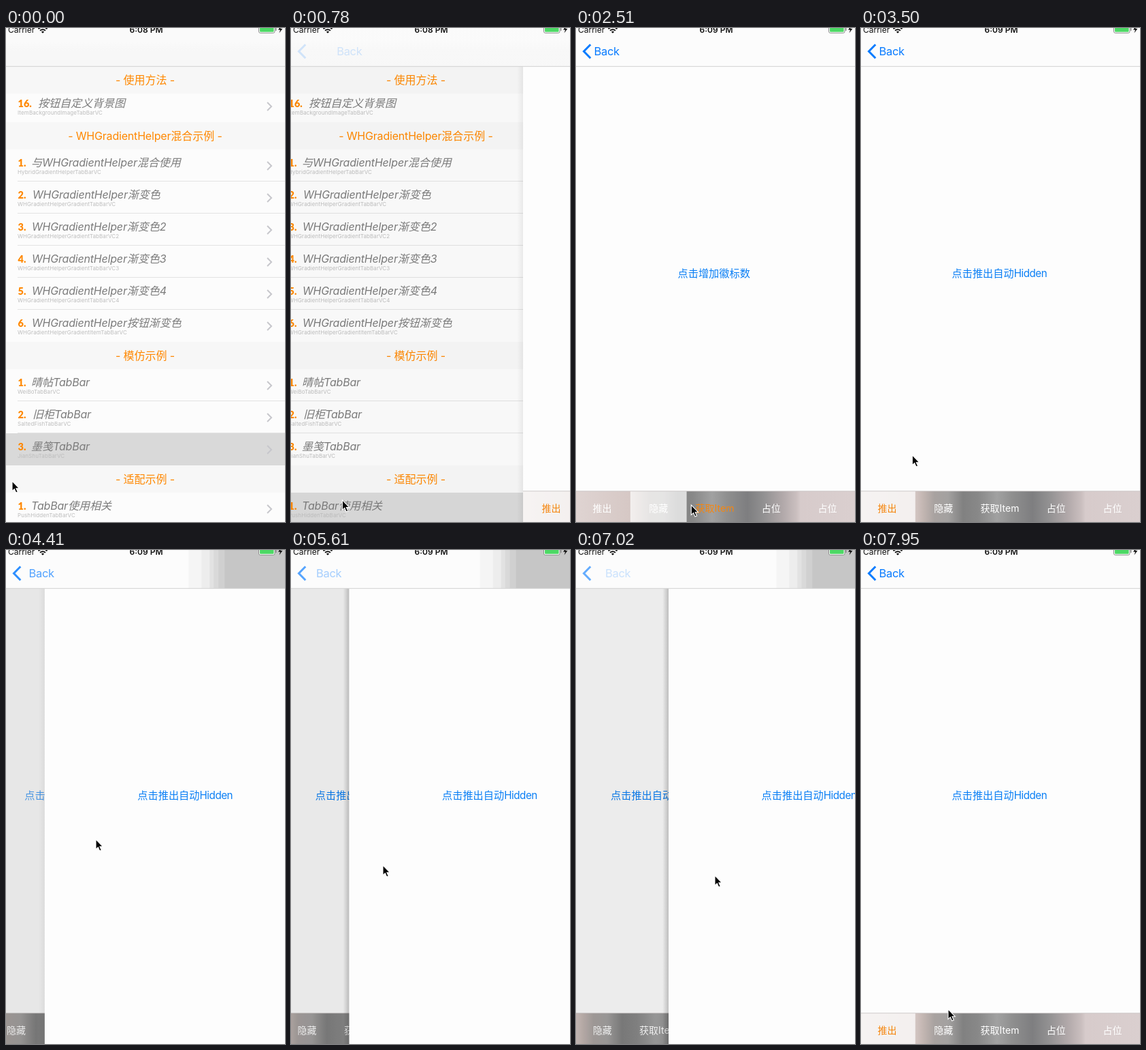
Animation of 410x724 px, one loop 8000 ms. Source, as an HTML page:

```html
<!DOCTYPE html>
<html lang="zh">
<head>
<meta charset="utf-8">
<style>
html, body { margin: 0; width: 100%; height: 100%; overflow: hidden; background: #fdfdfd; }
svg { display: block; width: 100vw; height: 100vh; }
text { font-family: Inter, "Noto Sans CJK SC", "Noto Sans CJK", sans-serif; white-space: pre; }
.head { font-size: 16px; fill: #ff8800; text-anchor: middle; }
.title { font-size: 16px; fill: #7c7c7c; font-style: italic; }
.num { font: 900 14.5px Lato, sans-serif; fill: #ff8800; }
.sub { font-size: 8px; letter-spacing: .1px; fill: #bdbdbd; }
.link { font-size: 15.2px; fill: #0a7ff5; }
.tab { font-size: 14px; text-anchor: middle; }
.back { font-size: 16.5px; fill: #0a7cff; letter-spacing: -.02em; }
.carrier { font-size: 12px; fill: #111; }
.clock { font-size: 12px; font-weight: 600; fill: #111; text-anchor: middle; }
</style>
</head>
<body>
<svg id="stage" viewBox="0 0 410 724">
  <defs>
    <linearGradient id="photo" gradientUnits="userSpaceOnUse" x1="0" x2="410"></linearGradient>
    <linearGradient id="shade">
      <stop offset="0" stop-opacity="0"/><stop offset="1"/>
    </linearGradient>
    <linearGradient id="listNav" x2="0" y2="1">
      <stop offset=".35" stop-color="#fafafa"/><stop offset=".6" stop-color="#f7f7f7"/>
    </linearGradient>
  </defs>
</svg>
<script>
const NS = 'http://www.w3.org/2000/svg';
const stage = document.getElementById('stage');
const LOOP = 8000, W = 414, LEFT = -3;

function add(parent, tag, attrs = {}, content) {
  const el = document.createElementNS(NS, tag);
  set(el, attrs);
  if (content !== undefined) el.textContent = content;
  parent.appendChild(el);
  return el;
}
function set(el, attrs) {
  for (const k in attrs) el.setAttribute(k, attrs[k]);
}
const show = (el, on) => el.setAttribute('visibility', on ? 'inherit' : 'hidden');
const rect = (parent, x, y, width, height, fill) => add(parent, 'rect', { x, y, width, height, fill });
const moveTo = (el, x, y = 0) => el.setAttribute('transform', `translate(${x.toFixed(2)} ${y.toFixed(2)})`);
const path = (parent, d, stroke, width) =>
  add(parent, 'path', { d, fill: 'none', stroke, 'stroke-width': width });

// Latin runs are tracked a little tighter than the Chinese ones.
function mixed(parent, cls, x, y, str, tight = -.012) {
  const el = add(parent, 'text', { class: cls, x, y });
  fillMixed(el, str, tight);
  return el;
}
function fillMixed(el, str, tight) {
  if (el.dataset.str === str) return;
  el.dataset.str = str;
  el.textContent = '';
  for (const run of str.match(/[\x20-\x7e]+|[^\x20-\x7e]+/g)) {
    const latin = run.charCodeAt(0) < 127;
    add(el, 'tspan', latin ? { 'letter-spacing': tight + 'em' } : {}, run);
  }
}

// photo-like strip behind the tabs
[[0, '#dfd4d2'], [78, '#d6c8c5'], [92, '#c2b5b1'], [108, '#a8a2a0'], [128, '#a3a1a0'],
 [150, '#818181'], [172, '#888888'], [200, '#a1a1a1'], [222, '#8f8f8f'], [252, '#7e7e80'],
 [275, '#919091'], [305, '#b3aaab'], [324, '#cabfbf'], [330, '#d7cbcb'], [410, '#dacfcf']]
  .forEach(([x, c]) => add(document.getElementById('photo'), 'stop', { offset: x / 410, 'stop-color': c }));

// list page
const list = add(stage, 'g');
rect(list, LEFT, 0, W, 724, '#fcfcfc');
const marks = [];
function row(y, num, x, title, sub, line = true) {
  marks.push(rect(list, LEFT, y, W, 47, '#d9d9d9'));
  add(list, 'text', { class: 'num', x: 17.5, y: y + 24.5 }, num);
  mixed(list, 'title', x, y + 25, title);
  add(list, 'text', { class: 'sub', x: 17, y: y + 36 }, sub);
  path(list, `M384 ${y + 18}l6 6l-6 6`, '#c7c7cc', 2);
  if (line) rect(list, 17, y + 46, 394, 1, '#e3e3e3');
}
function header(y, title) {
  rect(list, LEFT, y, W, 40, '#f7f7f7');
  mixed(list, 'head', 204.5, y + 26, `- ${title} -`);
}
row(91, '16.', 47, '按钮自定义背景图', 'ItemBackgroundImageTabBarVC', false);
header(56, '使用方法');
header(138, 'WHGradientHelper混合示例');
row(178, '1.', 37, '与WHGradientHelper混合使用', 'HybridGradientHelperTabBarVC');
['', '2', '3', '4'].forEach((n, i) =>
  row(225 + 47 * i, i + 2 + '.', i ? 38 : 39, 'WHGradientHelper渐变色' + n, 'WHGradientHelperGradientTabBarVC' + n));
row(413, '6.', 38, 'WHGradientHelper按钮渐变色', 'WHGradientHelperGradientItemTabBarVC', false);
header(460, '模仿示例');
row(500, '1.', 37, '晴帖TabBar', 'WeiBoTabBarVC');
row(547, '2.', 39, '旧柜TabBar', 'SaltedFishTabBarVC');
row(594, '3.', 37, '墨笺TabBar', 'JianShuTabBarVC', false);
header(641, '适配示例');
row(681, '1.', 37, 'TabBar使用相关', 'PushHiddenTabBarVC');
const lastMark = marks[marks.length - 1], oldMark = marks[marks.length - 2];
marks.forEach(m => show(m, m === oldMark));

const dimList = rect(stage, LEFT, 56, W, 668, '#000');

// page with the tab bar
function edge(parent) {
  const el = rect(parent, LEFT - 9, 56, 9, 668, 'url(#shade)');
  rect(parent, LEFT, 0, W, 724, '#fdfdfd');
  return el;
}
const main = add(stage, 'g');
const mainEdge = edge(main);
const LINKS = [[133.5, '点击推出自动Hidden'], [147, '点击隐藏TabBar'], [149.5, '点击增加徽标数']];
const mainLink = add(main, 'text', { class: 'link', y: 365 });
rect(main, LEFT, 679, W, 45, 'url(#photo)');
const pick = add(main, 'rect', { y: 679, width: W / 5, height: 45, fill: '#fff', opacity: .72 });
rect(main, LEFT, 678.4, W, .8, '#c4bfbf');
const tabs = ['推出', '隐藏', '获取Item', '占位', '占位'].map((s, i) =>
  mixed(main, 'tab', LEFT + W / 5 * (i + .5), 708.5, s, 0));

const dimMain = rect(stage, LEFT, 56, W, 668, '#000');

// page without the tab bar
const sub = add(stage, 'g');
const subEdge = edge(sub);
mixed(sub, 'link', LINKS[0][0], 365, LINKS[0][1], -.03);

// navigation bar
rect(stage, 0, 0, 410, 56, '#fcfcfc');
const listNav = rect(stage, 0, 0, 410, 56, 'url(#listNav)');
const bands = add(stage, 'g');
[[0, '#f5f5f5'], [19, '#ededed'], [31, '#e2e2e2'], [37, '#d9d9d9'], [44, '#d0d0d0'], [53, '#c6c6c6']]
  .forEach(([x, c]) => rect(bands, x, 0, 420, 56, c));
rect(stage, 0, 55.8, 410, 1, '#d2d2d2');
const arrow = path(stage, 'M21.3 24.3L11.5 34.2L21.3 44.2', '#0a7cff', 3);
const back = add(stage, 'text', { class: 'back', x: 26.5, y: 40 }, 'Back');
const backIn = add(stage, 'text', { class: 'back', x: 26.5, y: 40 }, 'Back');

// status bar
add(stage, 'text', { class: 'carrier', x: 3, y: 7 }, 'Carrier');
path(stage, 'M47.5 1.2Q54 -4 60.5 1.2M50 3.7Q54 .6 58 3.7', '#111', 1.9);
add(stage, 'path', { d: 'M51.8 5.4Q54 3.9 56.2 5.4L54 7.8Z', fill: '#111' });
const clock = add(stage, 'text', { class: 'clock', x: 206, y: 7 });
add(stage, 'rect', { x: 371.5, y: -4, width: 23.5, height: 11.3, rx: 2.2, fill: '#fff', stroke: '#8a8a8a' });
add(stage, 'rect', { x: 373, y: -3, width: 20.5, height: 8.8, rx: 1, fill: '#4cd964' });
rect(stage, 396, 0, 1.4, 4, '#8a8a8a');
add(stage, 'path', { d: 'M404.5 -4L400 2.8H403L401.5 7.5L406.3 1H403.3Z', fill: '#111' });

const cursor = add(stage, 'path', {
  d: 'M0 0V14.6L3.3 11.6L5.7 17L8.3 15.9L5.9 10.7H10.3Z',
  fill: '#000', stroke: '#fff', 'stroke-width': 1.1
});

// time, x, y
const CURSOR = [[0, 9, 664], [120, 9, 664], [490, 74, 692], [720, 74, 692], [1210, 108, 690],
  [1410, 112, 693], [1830, 112, 693], [2210, 168, 699], [2500, 170, 699], [2740, 53, 699],
  [2900, 53, 699], [2970, 52, 699], [3300, 52, 699], [3970, 160, 361], [4200, 160, 361],
  [4410, 132, 424], [4800, 40, 452], [5150, 18, 458], [5610, 135, 462], [7020, 204, 477],
  [7300, 216, 492], [7950, 128, 673], [8000, 128, 673]];
const DRAG = [[5200, 0], [5610, 88.5], [7020, 139], [7300, 166], [7800, W]];

const clamp = v => Math.max(0, Math.min(1, v));
const smooth = u => u * u * (3 - 2 * u);
function along(keys, t, ease) {
  if (t <= keys[0][0]) return keys[0].slice(1);
  for (let i = 1; i < keys.length; i++) {
    const [a, ...from] = keys[i - 1], [b, ...to] = keys[i];
    if (t <= b) {
      const u = ease((t - a) / (b - a));
      return from.map((v, j) => v + (to[j] - v) * u);
    }
  }
  return keys[keys.length - 1].slice(1);
}

// remaining distance of a pushed page, as a critically damped spring
function pushX(t, start) {
  const s = Math.max(0, t - start) * .018;
  return s > 8 ? 0 : W * (1 + s) * Math.exp(-s);
}

const selected = t => t < 1830 ? 0 : t < 2510 ? 1 : t < 3210 ? 2 : 0;

// an upper page at x shifts and darkens the one beneath it
function stack(upper, lower, dim, x) {
  const p = x / W, under = -.3 * (W - x);
  moveTo(upper, x);
  moveTo(lower, under);
  show(upper, x < W);
  show(lower, x > 0);
  set(dim, { opacity: .1 * (1 - p) });
  show(dim, x > 0 && x < W);
}

function draw(t) {
  const mainX = pushX(t, 740);
  const subX = t < 5200 ? pushX(t, 4221) : along(DRAG, t, u => u)[0];
  const p = subX / W, inSub = subX < W, dragging = t > 4800;

  stack(main, list, dimList, mainX);
  if (mainX === 0) {
    stack(sub, main, dimMain, subX);
  } else {
    show(sub, false);
    show(dimMain, false);
  }
  set(mainEdge, { opacity: mainX > 0 ? .06 : 0 });
  set(subEdge, { opacity: subX > 0 ? (dragging ? .2 : .05) : 0 });
  show(oldMark, t < 720);
  show(lastMark, t >= 720);

  const tab = selected(t);
  tabs.forEach((el, i) => set(el, { fill: i === tab ? '#f5860f' : '#fff' }));
  set(pick, { x: LEFT + W / 5 * selected(t - 40) });
  fillMixed(mainLink, LINKS[tab][1], -.03);
  const pressed = t >= 4030 && t < 4800 ? .35 + .65 * clamp((t - 4200) / 380) : 1;
  set(mainLink, { x: LINKS[tab][0], opacity: pressed });

  set(listNav, { opacity: mainX / W });
  moveTo(bands, 248.5 + .33 * subX);
  set(bands, { opacity: inSub ? clamp(subX / 40) * clamp((W - subX) / 60) : 0 });
  if (inSub) {
    moveTo(back, .119 * subX);
    set(back, { opacity: Math.exp(-(dragging ? 4.8 : 2.5) * p) * clamp((1 - p) * 3) });
    set(arrow, { opacity: 1 - (dragging ? .4 : .22) * Math.sqrt(Math.sin(Math.PI * p)) });
    moveTo(backIn, -30 * (1 - p));
    set(backIn, { opacity: clamp((p - .5) * 2) });
  } else {
    const q = mainX / W;
    moveTo(back, 49 * q);
    set(back, { opacity: 1 - q });
    set(arrow, { opacity: 1 - q });
    set(backIn, { opacity: 0 });
  }

  clock.textContent = t < 1530 ? '6:08 PM' : '6:09 PM';
  moveTo(cursor, ...along(CURSOR, t, smooth));
}

function tick() {
  draw(performance.now() % LOOP);
  requestAnimationFrame(tick);
}
tick();
</script>
</body>
</html>
```
